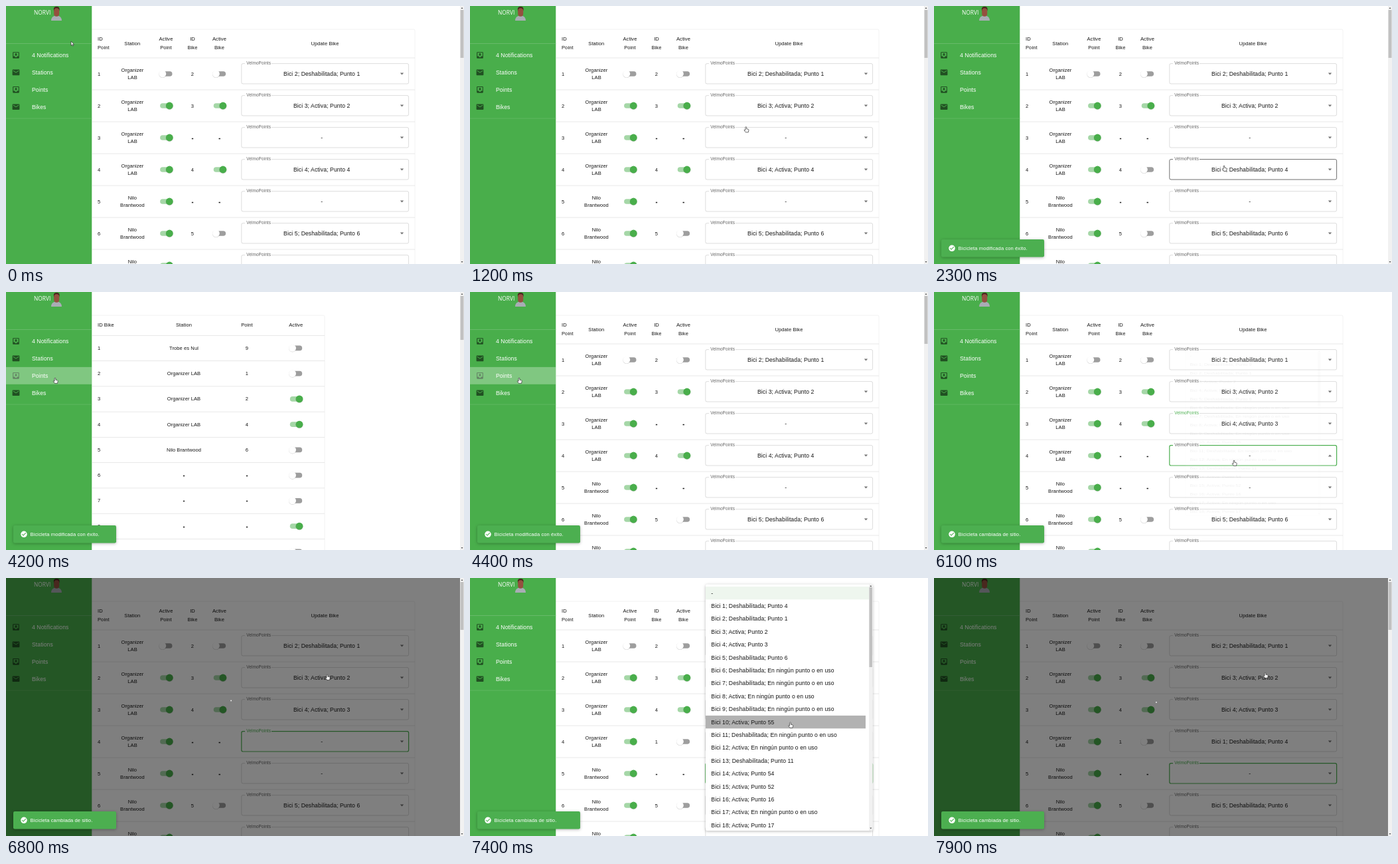
Animation, 690 px wide and 388 px high, one loop 8000 ms. Source, as an HTML page:

```html
<!DOCTYPE html>
<html lang="es">
<head>
<meta charset="utf-8">
<style>
  html, body { margin: 0; width: 100%; height: 100%; overflow: hidden; background: #fff; }
  svg { display: block; width: 690px; height: 388px; font-family: "Liberation Sans", Arial, sans-serif; }
  text { letter-spacing: .01em; fill: #161616; white-space: pre; }
  .mid { text-anchor: middle; }
  .white { fill: #fff; }
  .bold { font-weight: 700; stroke: #161616; stroke-width: .4; }
  .user { font-family: "Open Sans", sans-serif; letter-spacing: 0; }
  .raised { filter: drop-shadow(0 1.5px 2px rgba(0, 0, 0, .28)); }
</style>
</head>
<body>
<svg id="stage" viewBox="0 0 690 388"></svg>
<script>
const LOOP = 8000, STEP = 100;
const GREEN = '#4caf50', SIDE_GREEN = '#49ae4b', SMALL = 7.56, LARGE = 8.64;
const STATIONS = ['Organizer LAB', 'Nilo Brantwood', 'Trobe es Nul'];
const MAIL = 'M20 4H4c-1.1 0-2 .9-2 2v12c0 1.1.9 2 2 2h16c1.1 0 2-.9 2-2V6c0-1.1-.9-2-2-2zm0 4l-8 5-8-5V6l8 5 8-5v2z';
const INBOX = 'M19 3H5c-1.1 0-2 .9-2 2v14c0 1.1.9 2 2 2h14c1.1 0 2-.9 2-2V5c0-1.1-.9-2-2-2zm0 12h-4c0 1.66-1.35 3-3 3s-3-1.34-3-3H5V5h14v10zm-3-5h-2V7h-4v3H8l4 4 4-4z';
const CHECK = 'M12 2a10 10 0 1 0 0 20 10 10 0 0 0 0-20zm-2 15l-5-5 1.4-1.4 3.6 3.6 7.6-7.6L19 8l-9 9z';
const HAND = 'M-1 .8Q0-.7 1 .8V3.6L4 4.3Q4.8 4.6 4.6 6L3.9 9.3H-.6L-3.1 5.9Q-3.2 4.6-1 5.8Z';
const ARROW = 'M0 0V7.2L1.7 5.7 2.8 8.2 3.9 7.7 2.8 5.3H5Z';

// pointer path: time, x, y
const PATH = [
  [0, 98, 53], [300, 140, 58], [900, 318, 243], [1000, 318, 243], [1300, 450, 160],
  [1500, 430, 335], [1800, 318, 243], [2200, 318, 243], [2300, 437, 240], [2500, 437, 240],
  [3000, 70, 148], [3200, 70, 148], [3500, 436, 197], [3700, 436, 197], [4100, 80, 131],
  [4200, 74, 129], [4400, 74, 129], [4900, 450, 196], [5000, 450, 196], [5300, 410, 103],
  [5400, 410, 103], [6000, 452, 253], [6100, 452, 253], [6400, 430, 40], [6500, 430, 40],
  [6800, 484, 145], [7100, 470, 293], [7200, 470, 293], [7600, 495, 141], [7900, 499, 142]
];
const MENUS = [[5000, 5500, 3], [6100, 6600, 4], [7200, 7700, 5]];
const LOADING = [[5500, 5800], [6600, 7000], [7700, 8000]];
const TOASTS = [
  [1900, 2900, 'Bicicleta modificada con éxito.'],
  [3800, 4700, 'Bicicleta modificada con éxito.'],
  [5800, 8000, 'Bicicleta cambiada de sitio.']
];

const current = (list, t) => list.find(([from, to]) => t >= from && t < to);
const focusAt = t => t >= 7200 ? 5 : t >= 6100 ? 4 : t >= 5000 ? 3 : 0;
const stationOf = point => STATIONS[point < 5 ? 0 : point < 8 ? 1 : 2];

const text = (x, y, s, size = SMALL, cls = '', extra = '') =>
  `<text x="${x}" y="${y + size * .34}" font-size="${size}" class="${cls}" ${extra}>${s}</text>`;
const mid = (x, y, s, size) => text(x, y, s, size, 'mid');
const cell = (x, y, s) => text(x, y, s, SMALL, s === '-' ? 'mid bold' : 'mid');
const rect = (x, y, w, h, fill, extra = '') =>
  `<rect x="${x}" y="${y}" width="${w}" height="${h}" fill="${fill}" ${extra}/>`;
const rule = (x, y, w, color = '#dedede') => rect(x, y - .3, w, .7, color);
const icon = (d, x, y, fill, scale = .54) =>
  `<path transform="translate(${x - 12 * scale} ${y - 12 * scale}) scale(${scale})" d="${d}" fill="${fill}" fill-rule="evenodd"/>`;
const lines = (x, y, s, gap) => {
  const [first, second] = s.split(' ');
  return mid(x, y - gap / 2, first) + mid(x, y + gap / 2, second);
};
const toggle = (x, y, on) => {
  const cx = x + (on ? 5 : -5.4);
  return rect(x - 9.2, y - 3.8, 18.4, 7.6, on ? '#a5d7a7' : '#9e9e9e', 'rx="3.8"') +
    `<circle cx="${cx}" cy="${y + .5}" r="5.6" fill="#000" opacity=".16"/>` +
    `<circle cx="${cx}" cy="${y}" r="5.4" fill="${on ? SIDE_GREEN : '#fff'}"/>`;
};
const paper = w => rect(128, 35, w + 2, 400, '#fff', 'rx="2" stroke="#efefef" stroke-width=".8"');

function pointer(t) {
  const i = PATH.findIndex(([time]) => time > t);
  if (i < 0) return PATH.at(-1).slice(1);
  const [t0, x0, y0] = PATH[i - 1], [t1, x1, y1] = PATH[i];
  const k = (t - t0) / (t1 - t0), e = k * k * (3 - 2 * k);
  return [x0 + (x1 - x0) * e, y0 + (y1 - y0) * e];
}

function bikesAt(t) {
  const bikes = 'D9 D1 A2 A4 D6 D D A D A55 D A D11 A54 A52 A16 A A17'.split(' ')
    .map((s, i) => ({ id: i + 1, on: s[0] === 'A', point: +s.slice(1) }));
  if (t >= 1900 && t < 3700) bikes[3].on = false;
  if (t >= 5800) bikes[3].point = 3;
  if (t >= 7000) bikes[0].point = 4;
  return bikes;
}
const describe = b =>
  `Bici ${b.id}; ${b.on ? 'Activa' : 'Deshabilitada'}; ${b.point ? 'Punto ' + b.point : 'En ningún punto o en uso'}`;

function sidebar(px, py) {
  const items = ['4 Notifications', 'Stations', 'Points', 'Bikes'];
  return rect(0, 0, 129.3, 388, SIDE_GREEN) +
    text(42, 10.3, 'NORVI', 8.4, 'white user') +
    '<path d="M68 22Q68 15 76 14Q84 15 84 22Z" fill="#a9adb5"/>' +
    '<rect x="71.8" y="1" width="8.8" height="8" rx="4" fill="#47241d"/>' +
    '<rect x="72.2" y="3.2" width="8" height="12.6" rx="4" fill="#94503f"/>' +
    rule(0, 56.3, 129.3, '#74c077') + rule(0, 169, 129.3, '#66b969') +
    items.map((name, i) => {
      const y = 74 + i * 25.92, hover = px < 129 && Math.abs(py - y) < 12.96;
      return icon(i % 2 ? MAIL : INBOX, 15, y, 'rgba(0,0,0,.54)') +
        (hover ? rect(0, y - 12.96, 129.3, 25.92, 'rgba(255,255,255,.3)') : '') +
        text(39, y, name, LARGE, 'white');
    }).join('');
}

function select(y, value, { hover, focus, labelFocus, open }) {
  const stroke = focus ? GREEN : hover ? '#333' : 'rgba(0,0,0,.2)';
  const tip = open ? -1.4 : 1.4;
  return rect(354.8, y - 15.4, 251.8, 30.4, 'none', `rx="2.2" stroke="${stroke}" stroke-width="${focus ? 1.2 : .7}"`) +
    rect(360, y - 17, 40, 3, '#fff') +
    text(362.3, y - 15.8, 'VelmoPoints', 6.48, '', `style="fill:${labelFocus ? GREEN : '#666'}"`) +
    mid(475.7, y, value, LARGE) +
    `<path d="M593.8 ${y - tip}h5.4l-2.7 ${2 * tip}z" fill="#757575"/>`;
}

function pointsPage(t, bikes, px, py, blocked, menu) {
  let out = paper(486) + text(138, 49.5, 'ID') + text(138, 62.5, 'Point') +
    mid(190.3, 56, 'Station') + lines(241, 56, 'Active Point', 13) + lines(281, 56, 'ID Bike', 13) +
    lines(321.5, 56, 'Active Bike', 13) + mid(480.5, 56, 'Update Bike') + rule(130, 78, 486);
  for (let id = 1; id <= 7; id++) {
    const y = 54 + 48 * id, bike = bikes.find(b => b.point === id);
    out += text(138, y, id) + lines(190.5, y, stationOf(id), 10.9) + toggle(241.3, y, id > 1) +
      cell(281, y, bike ? bike.id : '-') +
      (bike ? toggle(321.9, y, bike.on) : cell(321.9, y, '-')) +
      select(y, bike ? describe(bike) : '-', {
        hover: !blocked && px > 355 && px < 607 && Math.abs(py - y) < 15,
        focus: focusAt(t) === id,
        labelFocus: focusAt(t - STEP) === id,
        open: menu && menu[2] === id
      }) + rule(130, y + 24, 486);
  }
  return out;
}

function bikesPage(bikes) {
  let out = paper(350) + text(138, 49.5, 'ID Bike') + mid(268, 49.5, 'Station') +
    mid(363, 49.5, 'Point') + mid(436.7, 49.5, 'Active') + rule(130, 65.3, 350);
  bikes.slice(0, 9).forEach(({ id, point, on }, i) => {
    const y = 84.4 + 38.25 * i;
    out += text(138, y, id) + cell(268, y, point ? stationOf(point) : '-') +
      cell(363, y, point || '-') + toggle(437, y, on) + rule(130, y + 19.2, 350);
  });
  return out;
}

function scrollbar(end) {
  return rect(684, 0, 6, 388, '#f1f1f1') + rect(684.6, 6, 4.8, end - 6, '#c1c1c1') +
    '<path d="M685.5 4h3l-1.5-2zM685.5 384h3l-1.5 2z" fill="#555"/>';
}

function menuLayer(t, [start, , row], bikes, px, py) {
  const growing = t === start, oy = 54 + 48 * row;
  const attrs = growing
    ? `opacity=".05" transform="translate(480 ${oy}) scale(.81 .67) translate(-480 ${-oy})"` : '';
  const items = ['-', ...bikes.map(describe)].map((label, i) => {
    const y = 22.6 + 19.4 * i, hover = !growing && Math.abs(py - y) < 9.7 && px > 355;
    const fill = hover ? '#b2b2b2' : i ? '' : '#eef6ee';
    return (fill ? rect(355, y - 9.7, hover ? 241 : 246, 19.4, fill) : '') +
      text(363.3, y, label, LARGE);
  }).join('');
  return `<g ${attrs}>` + rect(355, 9.5, 251.5, 370.5, '#fff', 'rx="2.2" class="raised"') + items +
    rect(601, 9.5, 5.5, 370.5, '#f1f1f1') + rect(601.5, 14, 4.5, 120, '#c1c1c1') +
    '<path d="M602.3 13h3l-1.5-2zM602.3 375.5h3l-1.5 2z" fill="#555"/></g>';
}

function backdrop(t, [start]) {
  const angle = (-107 + .629 * (t - 6800)) * Math.PI / 180;
  return rect(0, 0, 684, 388, '#000', `opacity="${t === start ? .25 : .5}"`) +
    `<circle cx="${342 + 10 * Math.cos(angle)}" cy="${194 + 10 * Math.sin(angle)}" r=".9" fill="#fff"/>`;
}

function toastLayer(t, [start, , message]) {
  return `<g opacity="${t === start ? .5 : 1}">` +
    rect(11, 351, 155, 26.4, GREEN, 'rx="2.2" class="raised"') +
    icon(CHECK, 27, 364.3, '#fff', .48) + text(36.6, 364.3, message, 7.6, 'white') + '</g>';
}

function scene(t) {
  const [px, py] = pointer(t), bikes = bikesAt(t);
  const menu = current(MENUS, t), loading = current(LOADING, t), toast = current(TOASTS, t);
  const onBikes = t >= 3100 && t < 4400, blocked = menu || loading;
  const arrow = t < 800;
  return (onBikes ? bikesPage(bikes) : pointsPage(t, bikes, px, py, blocked, menu)) +
    sidebar(blocked ? 999 : px, py) +
    (menu ? '' : scrollbar(onBikes ? 72 : 78)) +
    (loading ? backdrop(t, loading) : '') +
    (menu ? menuLayer(t, menu, bikes, px, py) : '') +
    (toast ? toastLayer(t, toast) : '') +
    `<path transform="translate(${px} ${py}) scale(.9)" d="${arrow ? ARROW : HAND}" fill="#fff" stroke="#333" stroke-width=".8"/>`;
}

const stage = document.getElementById('stage');
let shown = -1;
function tick() {
  const t = Math.floor(performance.now() % LOOP / STEP) * STEP;
  if (t !== shown) stage.innerHTML = scene(shown = t);
  requestAnimationFrame(tick);
}
tick();
</script>
</body>
</html>
```
